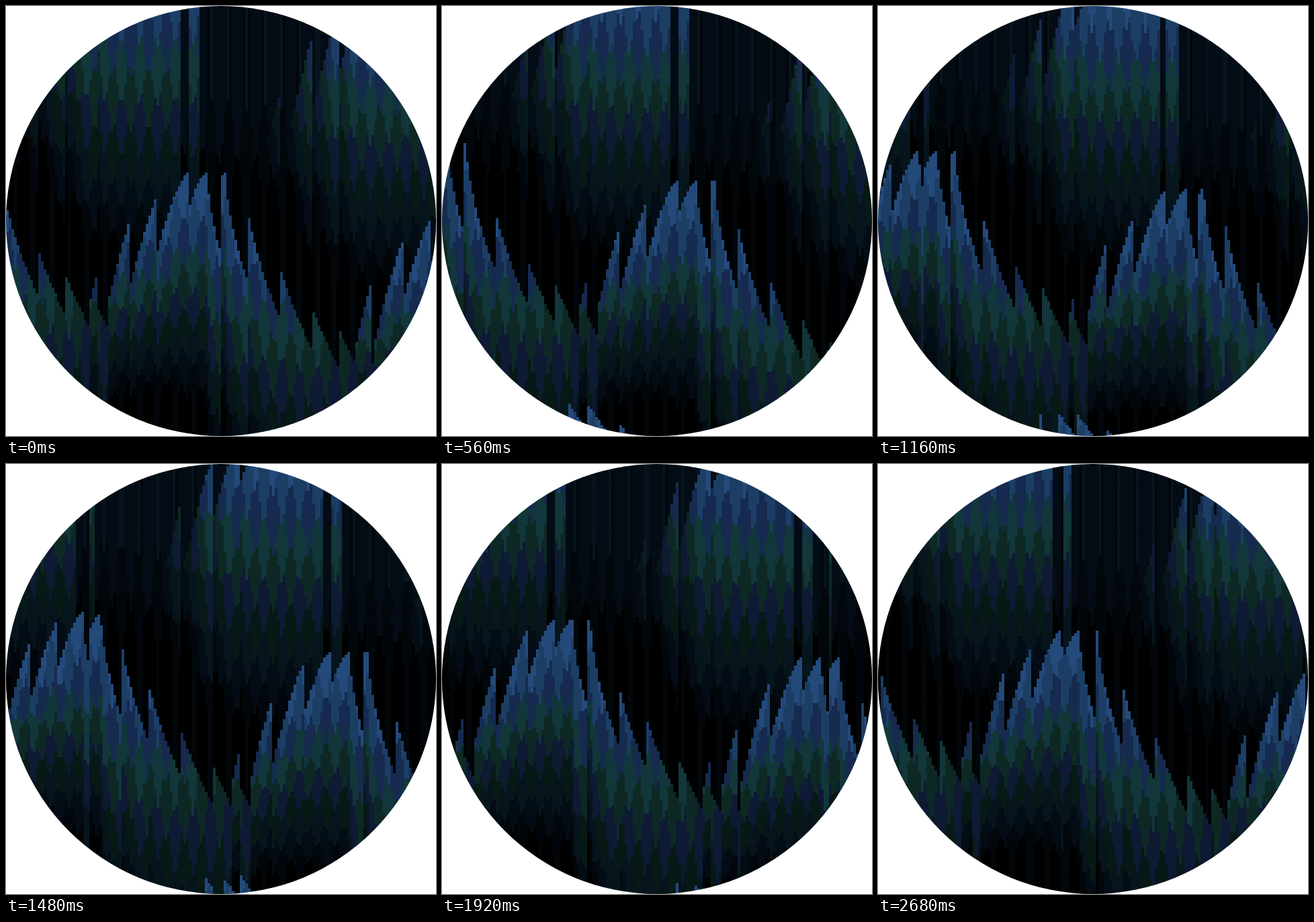
An HTML page with a canvas that plays this animation: 640 by 640 pixels, repeating every 2720 ms.

```html
<!DOCTYPE html>
<html>
<head>
<meta charset="utf-8">
<style>
html, body { margin: 0; width: 100%; height: 100%; overflow: hidden; background: #fff; }
canvas { display: block; width: 640px; height: 640px; }
</style>
</head>
<body>
<canvas id="stage" width="640" height="640"></canvas>
<script>
const SIZE = 640, CELL = 4, GRID = SIZE / CELL;
const STEPS = 68, STEP_MS = 40;
const PERIOD = 381, SLANT = 0.15, LENS = 1.5;
const COLUMN = 136 / 3, SCALE = PERIOD / 6;

// Posterised shades, dark to bright.
const SHADES = ["#000000", "#02070c", "#040d17", "#07161f", "#081c18", "#101d3a",
  "#0f2d28", "#143c40", "#182f57", "#1f4570", "#285288"].map(hex =>
  [1, 3, 5].map(i => parseInt(hex.slice(i, i + 2), 16)));

const mod = (a, b) => ((a % b) + b) % b;
const clamp = (a, lo = 0, hi = 1) => Math.min(hi, Math.max(lo, a));
const zigzag = a => 4 * Math.abs(mod(a, 1) - 0.5) - 1;
const smoothstep = (lo, hi, a) => {
  const k = clamp((a - lo) / (hi - lo));
  return k * k * (3 - 2 * k);
};

// Each ridge is the upper edge of a flame that fades out downwards.
function upperRidge(u) {
  const x = 278 + mod(u - 278, PERIOD), t = (x - 278) / PERIOD;
  const rise = smoothstep(0.25, 0.65, t);
  const top = 200 * smoothstep(0, 0.06, t) - 180 * rise;
  return { top: top - SLANT * x, amp: 2 + 8 * rise, len: 60 + 360 * rise };
}

function middleRidge(u) {
  const x = 140 + mod(u - 140, PERIOD);
  const left = clamp((305 - x) / 165), right = clamp((x - 305) / 216);
  return {
    top: 245 + 195 * left ** 1.5 + 290 * right ** 0.6 - SLANT * x,
    amp: 10.8 - 3.5 * left ** 3 - 5 * right,
    len: 380 - 210 * left - 60 * right
  };
}

function lowerRidge(u) {
  const x = 105 + mod(u - 105, PERIOD);
  return { top: 580 + 0.55 * (x - 105) - SLANT * x, amp: 10.8, len: 200 };
}

const profiles = Array.from({ length: PERIOD }, (_, u) =>
  [upperRidge, middleRidge, lowerRidge].map(ridge => ridge(u)));

function brightness(u, v) {
  let level = 0.6 + 1.8 * clamp((235 - v) / 150);
  for (const { top, amp, len } of profiles[Math.floor(mod(u, PERIOD))]) {
    const depth = v - top;
    if (depth >= 0 && depth < len) {
      level = Math.max(level, amp * (1 - (depth / len) ** 1.15));
    }
  }
  return level;
}

// Neighbouring shades meet along zigzags half a tooth apart, like scales.
function shadeIndex(level, u) {
  const tooth = 0.9 * zigzag(u / SCALE);
  let k = clamp(Math.floor(level) + 2, 1, SHADES.length - 1);
  while (k > 0 && level + (k % 2 ? tooth : -tooth) < k) k--;
  return k;
}

const small = document.createElement("canvas");
small.width = small.height = GRID;
const smallCtx = small.getContext("2d");
const image = smallCtx.createImageData(GRID, GRID);
const ctx = document.getElementById("stage").getContext("2d");
ctx.imageSmoothingEnabled = false;

function draw(step) {
  const drift = step * PERIOD / STEPS;
  for (let i = 0; i < GRID; i++) {
    const x = i * CELL;
    const across = x + step * 4;
    const column = Math.ceil((Math.floor(across / 8) - 39) * 3 / 17) - 1;
    const centre = 317 + COLUMN * (column + 0.5);
    const seen = x + LENS * (across + 2 - centre);
    const u = seen - drift;
    for (let j = 0; j < GRID; j++) {
      const level = brightness(u, j * CELL - SLANT * seen);
      image.data.set([...SHADES[shadeIndex(level, u)], 255], (j * GRID + i) * 4);
    }
  }
  smallCtx.putImageData(image, 0, 0);

  ctx.fillStyle = "#fff";
  ctx.fillRect(0, 0, SIZE, SIZE);
  ctx.save();
  ctx.beginPath();
  ctx.arc(SIZE / 2, SIZE / 2, SIZE / 2, 0, Math.PI * 2);
  ctx.clip();
  ctx.drawImage(small, 0, 0, SIZE, SIZE);
  ctx.fillStyle = "rgba(0,0,0,0.2)";
  for (let y = 1; y < SIZE; y += 2) ctx.fillRect(0, y, SIZE, 1);
  ctx.restore();
}

let begun = null, shown = -1;
function tick(now) {
  if (begun === null) begun = now;
  const step = Math.floor((now - begun) / STEP_MS) % STEPS;
  if (step !== shown) draw(shown = step);
  requestAnimationFrame(tick);
}
requestAnimationFrame(tick);
</script>
</body>
</html>
```
